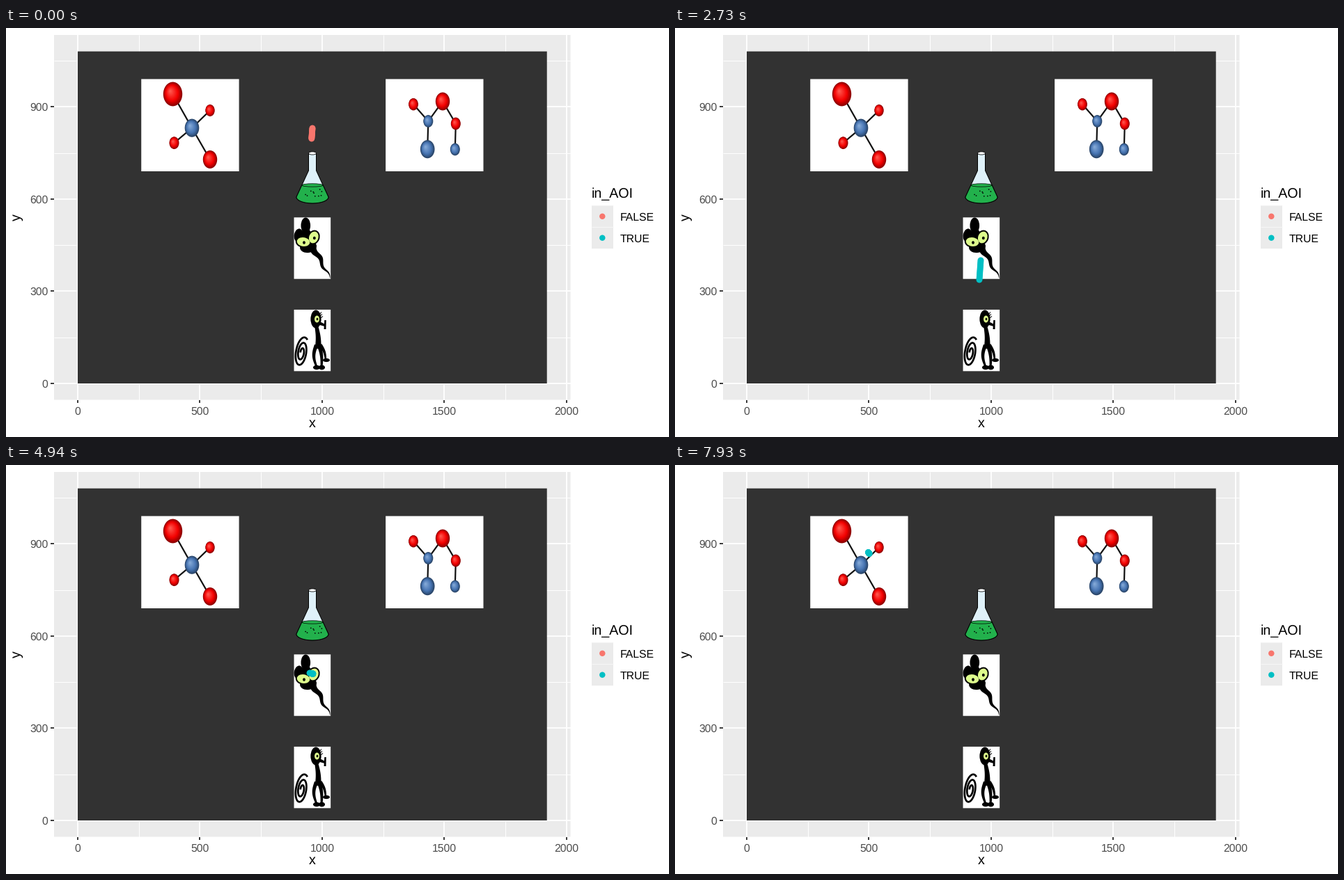
Animation, 952 px wide and 588 px high, one loop 8000 ms. Source, as a matplotlib script:

```python
import numpy as np
import matplotlib.pyplot as plt
from matplotlib.animation import FuncAnimation
from matplotlib.collections import PatchCollection
from matplotlib.colors import to_rgb
from matplotlib.patches import Ellipse, Polygon, Rectangle

W, H, DPI = 952, 588, 100
PX = 72 / DPI
LOOP, INTERVAL, STEP = 8000, 40, 130
TRAIL, DOTS = 260, 15
CORAL, TEAL = "#F8766D", "#00BFC4"
GLASS, LIQUID, EYE = "#DFF1F9", "#22B14C", "#DDFB8C"

plt.rcParams["font.family"] = "Liberation Sans"
plt.rcParams["text.hinting"] = "none"
fig = plt.figure(figsize=(W / DPI, H / DPI), dpi=DPI, facecolor="white")
ax = fig.add_axes([0, 0, 1, 1])
ax.set_xlim(0, W)
ax.set_ylim(H, 0)
ax.axis("off")


def sx(x):
    return 103 + x * 0.3509


def sy(y):
    return 511 - y * 0.442


def box(x, y, w, h):
    """Data rectangle as pixel edges: left, top, right, bottom."""
    return sx(x), sy(y + h), sx(x + w), sy(y)


LEFT, RIGHT = box(260, 690, 400, 300), box(1260, 690, 400, 300)
FACE, FIGURE = box(885, 340, 150, 200), box(885, 40, 150, 200)


def rect(x0, y0, x1, y1, color, z=1):
    ax.add_patch(Rectangle((x0, y0), x1 - x0, y1 - y0, fc=color, ec="none",
                           zorder=z, snap=False))


def line(xs, ys, color="black", width=1.0, z=4):
    ax.plot(xs, ys, color=color, lw=width * PX, zorder=z, solid_capstyle="butt")


def label(x, y, text, size, color="black", **kw):
    ax.text(x, y, text, fontsize=size * PX, color=color, **kw)


def oval(x, y, rx, ry, color="black", edge="none", width=0.0, z=5, angle=0):
    ax.add_patch(Ellipse((x, y), 2 * rx, 2 * ry, angle=angle, fc=color, ec=edge,
                         lw=width * PX, zorder=z))


def limb(start, end, w0, w1, bow=0, waves=1):
    """Black tapered stroke that swings sideways by bow."""
    p, d = np.array(start, float), np.subtract(end, start)
    normal = np.array([-d[1], d[0]]) / np.hypot(*d)
    t = np.linspace(0, 1, 30)[:, None]
    mid = p + d * t + normal * bow * np.sin(np.pi * waves * t)
    half = normal * (w0 + (w1 - w0) * t) / 2
    ax.add_patch(Polygon(np.vstack([mid + half, (mid - half)[::-1]]),
                         fc="black", ec="none", zorder=4))


def molecule(atoms, bonds):
    for a, b in bonds:
        line([atoms[a][0], atoms[b][0]], [atoms[a][1], atoms[b][1]], "#111111", 2.2)
    shades = {"r": ("#8E0000", "#F40000", "#FF5A50"),
              "b": ("#2A4568", "#4674B2", "#86ABD8")}
    balls, colors = [], []
    for x, y, r, kind in atoms:
        ramp = np.array([to_rgb(c) for c in shades[kind]])
        for u in np.linspace(0, 1, 14):
            k = 1 - 0.93 * u
            balls.append(Ellipse((x - 0.28 * r * u, y - 0.32 * r * u),
                                 2 * r * k, 2.54 * r * k))
            colors.append([np.interp(u, [0, 0.35, 1], ramp[:, i]) for i in range(3)])
    ax.add_collection(PatchCollection(balls, facecolors=colors, edgecolors="none", zorder=5))


def draw_plot():
    rect(69, 10, 810.5, 534.5, "#EBEBEB")
    for v in range(0, 2001, 250):
        line([sx(v)] * 2, [10, 534.5], "white", 1.9 if v % 500 == 0 else 0.95, 2)
    for v in range(0, 1051, 150):
        line([69, 810.5], [sy(v)] * 2, "white", 1.9 if v % 300 == 0 else 0.95, 2)
    for v in range(0, 2001, 500):
        line([sx(v)] * 2, [534.5, 539.4], "#333333", 1.9)
        label(sx(v), 555.8, str(v), 15.7, "#4D4D4D", ha="center")
    for v in range(0, 901, 300):
        line([64.1, 69], [sy(v)] * 2, "#333333", 1.9)
        label(60.5, sy(v) + 5.6, str(v), 15.7, "#4D4D4D", ha="right")
    label(439.5, 574, "x", 19.6, ha="center")
    label(15.5, 272, "y", 19.6, rotation=90, ha="center", va="center")

    rect(*box(0, 0, 1920, 1080), "#323232", 3)
    for picture in (LEFT, RIGHT, FACE, FIGURE):
        rect(*picture, "white", 3)

    label(840.5, 244, "in_AOI", 19.6)
    for y, text, color in [(270.8, "FALSE", CORAL), (301.7, "TRUE", TEAL)]:
        rect(841, y - 15.4, 872, y + 15.4, "#EBEBEB")
        oval(856.3, y, 4.2, 4.2, color)
        label(882, y + 5.7, text, 15.7)
    line([841, 872], [286.2] * 2, "#F6F6F6")


def draw_flask():
    cx, top, neck, fill, base = 440, 180, 205, 226, 243

    def half_width(y):
        cone = np.interp(y, [neck, base], [5.5, 23])
        return cone * np.sqrt(1 - (np.clip(y - base, 0, 9) / 9) ** 2)

    def shape(y0, color):
        y = np.linspace(y0, base + 9, 120)
        w = half_width(y)
        outline = np.c_[np.r_[cx - w, (cx + w)[::-1]], np.r_[y, y[::-1]]]
        ax.add_patch(Polygon(outline, fc=color, ec="black", lw=PX, zorder=4))

    shape(top, GLASS)
    shape(fill, LIQUID)
    oval(cx, fill, half_width(fill), 2.2, LIQUID, "black", 0.7)
    oval(cx, top, 5.5, 2.1, "white", "black", 0.8)
    rng = np.random.default_rng(4)
    for x, y in zip(rng.uniform(428, 454, 10), rng.uniform(230, 242, 10)):
        oval(x, y, 0.9, 0.8)


def draw_face():
    oval(430.3, 284, 6.8, 11.5, z=4)
    oval(431, 298, 8, 9, z=4)
    oval(420, 298, 6.2, 9.6, z=4, angle=10)
    oval(434, 314.5, 12, 8.5, z=4, angle=-10)
    limb((441, 315), (465.2, 359.5), 10, 0.5, 1.8, 4)
    for x, y, rx, ry, tilt in [(427, 307.5, 9.3, 6.4, 8), (441.8, 301, 6.6, 8.6, 20)]:
        oval(x, y, rx + 2, ry + 2, z=4, angle=tilt)
        oval(x, y, rx, ry, EYE, angle=tilt)
        oval(x + 1, y + 1, 1.9, 2.2)


def draw_figure():
    oval(445, 418.5, 7.6, 13, z=4)
    oval(446.5, 418.5, 3.5, 5, EYE)
    oval(447, 418.5, 1.4, 1.8)
    for k in range(3):
        line([450, 453 + k], [412 + 3 * k, 408.5 + 3 * k])
    limb((449, 424), (458, 427.5), 5, 3)
    limb((458.5, 420), (458, 433), 2.5, 3)

    limb((445.5, 428), (448, 461), 5, 9, -1.5)
    limb((446, 455), (446, 487), 6, 3, 4)
    limb((449, 455), (453, 487), 6, 3, -2)
    limb((451, 455), (459, 477), 5, 2.5, -2)
    for x, y, rx, ry in [(446, 488, 5, 3.2), (453.5, 488, 4.5, 3.4), (460, 477.5, 5, 2.6)]:
        oval(x, y, rx, ry, z=4)

    a = np.linspace(0, 4.7 * np.pi, 100)
    grow = 0.18 + 0.82 * a / a[-1]
    dy = -22.5 * grow * np.sin(a)
    line(424.5 - 9.5 * grow * np.cos(a) - 0.15 * dy, 466.5 + dy, width=2.7)


draw_plot()
molecule([(239.5, 95, 13.7, "r"), (293, 118.5, 6.7, "r"), (267, 143.7, 10.3, "b"),
          (241.5, 165.2, 7, "r"), (293, 189, 10.2, "r")],
         [(k, 2) for k in (0, 1, 3, 4)])
molecule([(585, 109.7, 6.9, "r"), (606.3, 134, 7, "b"), (627, 105.5, 10.2, "r"),
          (645.8, 137.5, 7, "r"), (644.8, 174.5, 7, "b"), (605.2, 174.2, 10.3, "b")],
         [(0, 1), (1, 2), (2, 3), (3, 4), (1, 5)])
draw_flask()
draw_face()
draw_figure()

# Gaze path: time in ms, x, y
GAZE = np.array([
    (-260, 440, 144), (0, 438.8, 159), (1050, 426, 267), (1120, 428, 271),
    (1300, 436, 298), (2470, 439, 334), (2730, 437, 362), (3900, 437, 370),
    (4020, 446, 365), (4160, 471, 341), (4680, 436, 299), (4800, 441, 300),
    (5200, 438, 301), (5460, 284, 140), (6110, 271, 132), (6370, 278.5, 134),
    (7670, 277.5, 125.5), (8000, 279.5, 128),
]).T
dots = ax.scatter([], [], s=(8.9 * PX) ** 2, linewidths=0, zorder=9)


def in_aoi(x, y):
    """Inside a picture, with some slack to the right and below."""
    return any(x0 < x < x1 + 10 and y0 < y < y1 + 12
               for x0, y0, x1, y1 in (LEFT, RIGHT, FACE, FIGURE))


def update(i):
    now = (i * INTERVAL + INTERVAL - 1) // STEP * STEP
    t = np.linspace(now - TRAIL, now, DOTS)
    points = np.c_[np.interp(t, GAZE[0], GAZE[1]), np.interp(t, GAZE[0], GAZE[2])]
    dots.set_offsets(points)
    dots.set_facecolors([TEAL if in_aoi(x, y) else CORAL for x, y in points])
    return (dots,)


anim = FuncAnimation(fig, update, frames=LOOP // INTERVAL, interval=INTERVAL,
                     repeat=True, repeat_delay=0)
plt.show()
```
